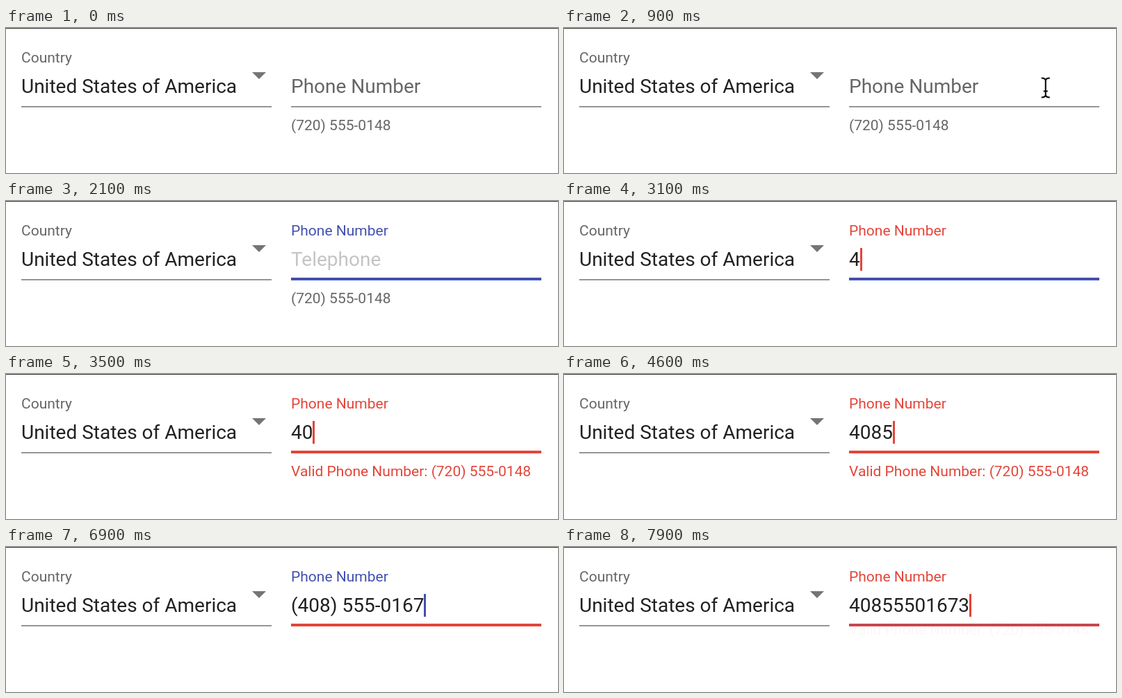
Write an HTML page with a canvas that moves like this. It is 794 px wide and 210 px high and loops after 8 s.

```html
<!DOCTYPE html>
<html lang="en">
<head>
<meta charset="utf-8">
<title>Phone field</title>
<style>
  html, body { margin: 0; width: 100%; height: 100%; overflow: hidden; background: #fff; }
  canvas { display: block; width: 794px; height: 210px; }
</style>
</head>
<body>
<canvas id="stage"></canvas>
<script>
const W = 794, H = 210, LOOP = 8000;
const canvas = document.getElementById('stage');
const ctx = canvas.getContext('2d');
const ratio = window.devicePixelRatio || 1;
canvas.width = W * ratio;
canvas.height = H * ratio;

const BLUE = [66, 80, 176], RED = [227, 69, 57], GREY = [102, 102, 102];
const INK = '#212121', LINE = '#949494';
const FIELD_X = 410, FIELD_W = 360;
const HINT = '(720) 555-0148';
const ERROR = 'Valid Phone Number: ' + HINT;
const DIGITS = '40855501673', FORMATTED = '(408) 555-0167';

// Key presses and the moments the field changes state
const KEYS = [3100, 3400, 3700, 4600, 4800, 5200, 5600, 5900, 6500, 6900, 7800];
const FOCUS = 1010, INVALID = 3100, VALID = 6900, INVALID_AGAIN = 7800;

const clamp = v => Math.min(1, Math.max(0, v));
const lerp = (a, b, p) => a + (b - a) * p;
const mix = (a, b, p) => a.map((v, i) => lerp(v, b[i], p));
const rgb = c => `rgb(${c.map(Math.round).join(',')})`;

function bezier(x1, y1, x2, y2) {
  const at = (a, b, s) => 3 * (1 - s) ** 2 * s * a + 3 * (1 - s) * s * s * b + s ** 3;
  return x => {
    if (x <= 0) return 0;
    if (x >= 1) return 1;
    let lo = 0, hi = 1;
    for (let i = 0; i < 24; i++) {
      const mid = (lo + hi) / 2;
      if (at(x1, x2, mid) < x) lo = mid; else hi = mid;
    }
    return at(y1, y2, lo);
  };
}
const swift = bezier(0.25, 0.8, 0.25, 1);
const enter = bezier(0.55, 0, 0.55, 0.2);

function text(str, x, y, size, color) {
  ctx.font = `${size}px Roboto, sans-serif`;
  ctx.fillStyle = color;
  ctx.fillText(str, x, y);
}

function polygon(points) {
  ctx.beginPath();
  points.forEach(([x, y]) => ctx.lineTo(x, y));
  ctx.closePath();
}

function drawCountry() {
  text('Country', 22, 50, 21, rgb(GREY));
  text('United States of America', 22, 94, 28, INK);
  ctx.fillStyle = LINE;
  ctx.fillRect(22, 113, 360, 2);
  ctx.fillStyle = '#757575';
  polygon([[354, 64], [374, 64], [364, 74]]);
  ctx.fill();
}

function typedValue(t) {
  const count = KEYS.filter(k => t >= k).length;
  return count === 10 ? FORMATTED : DIGITS.slice(0, count);
}

function isInvalid(t) {
  return (t >= INVALID && t < VALID) || t >= INVALID_AGAIN;
}

function drawLabel(t) {
  const p = swift(clamp((t - FOCUS) / 400));
  const color = isInvalid(t) ? RED : mix(GREY, BLUE, p);
  ctx.save();
  ctx.translate(FIELD_X, lerp(94, 50, p));
  ctx.scale(lerp(1, 0.75, p), lerp(1, 0.75, p));
  text('Phone Number', 0, 0, 28, rgb(color));
  ctx.restore();
}

function drawValue(t) {
  if (t < FOCUS) return;
  const value = typedValue(t);
  if (!value) {
    const fade = swift(clamp((t - FOCUS - 60) / 220));
    text('Telephone', FIELD_X, 94, 28, `rgba(0,0,0,${0.23 * fade})`);
  }
  text(value, FIELD_X, 94, 28, INK);
  if (t >= 2100 && t < 2300) return;
  const end = FIELD_X + ctx.measureText(value).width;
  ctx.fillStyle = rgb(isInvalid(t) ? RED : BLUE);
  ctx.fillRect(Math.round(end), 68, 3, 33);
}

function lineColor(t) {
  const turn = (from, to, start) => mix(from, to, swift(clamp((t - start) / 300)));
  if (t < VALID) return turn(BLUE, RED, INVALID);
  if (t < INVALID_AGAIN) return turn(RED, BLUE, VALID);
  return turn(BLUE, RED, INVALID_AGAIN);
}

function drawUnderline(t) {
  ctx.fillStyle = LINE;
  ctx.fillRect(FIELD_X, 113, FIELD_W, 2);
  if (t < FOCUS) return;
  const w = FIELD_W * lerp(0.5, 1, swift(clamp((t - FOCUS) / 300)));
  ctx.globalAlpha = swift(clamp((t - FOCUS) / 100));
  ctx.fillStyle = rgb(lineColor(t));
  ctx.fillRect(FIELD_X + (FIELD_W - w) / 2, 111, w, 4);
  ctx.globalAlpha = 1;
}

function drawMessage(t) {
  const start = [INVALID_AGAIN, VALID, INVALID, -LOOP].find(s => t >= s);
  const p = enter(clamp((t - start) / 300));
  const bad = isInvalid(t);
  ctx.globalAlpha = p;
  text(bad ? ERROR : HINT, FIELD_X, 148 - 22 * (1 - p), 21, rgb(bad ? RED : GREY));
  ctx.globalAlpha = 1;
}

function drawArrow(x, y) {
  polygon([[0, 0], [0, 29], [6.5, 23], [11, 34], [16, 32], [11.5, 21], [20.5, 21]]
    .map(([dx, dy]) => [x + dx, y + dy]));
  ctx.lineJoin = 'round';
  ctx.strokeStyle = '#fff';
  ctx.lineWidth = 4;
  ctx.stroke();
  ctx.fillStyle = '#000';
  ctx.fill();
}

function drawBeam(x, y) {
  ctx.beginPath();
  for (const s of [-1, 1]) {
    ctx.moveTo(x - 6, y + s * 14);
    ctx.quadraticCurveTo(x, y + s * 14, x, y + s * 10);
    ctx.quadraticCurveTo(x, y + s * 14, x + 6, y + s * 14);
  }
  ctx.moveTo(x, y - 12);
  ctx.lineTo(x, y + 12);
  ctx.moveTo(x - 3, y + 5);
  ctx.lineTo(x + 3, y + 5);
  for (const [color, width] of [['#fff', 5], ['#000', 2]]) {
    ctx.strokeStyle = color;
    ctx.lineWidth = width;
    ctx.stroke();
  }
}

function drawPointer(t) {
  if (t < 600 || t >= 1900) return;
  const p = 1 - (1 - clamp((t - 600) / 350)) ** 2;
  const x = lerp(780, 691, p), y = lerp(107, 86, p);
  if (t >= 1700) drawArrow(690, 87);
  else if (x > FIELD_X + FIELD_W) drawArrow(x, y);
  else drawBeam(x, y);
}

function draw(t) {
  ctx.setTransform(ratio, 0, 0, ratio, 0, 0);
  ctx.fillStyle = '#fff';
  ctx.fillRect(0, 0, W, H);
  ctx.fillStyle = '#333';
  ctx.fillRect(0, 0, W, 1);
  drawCountry();
  drawUnderline(t);
  drawMessage(t);
  drawLabel(t);
  drawValue(t);
  drawPointer(t);
}

const begin = performance.now();
function tick() {
  draw((performance.now() - begin) % LOOP);
  requestAnimationFrame(tick);
}
tick();
</script>
</body>
</html>
```
